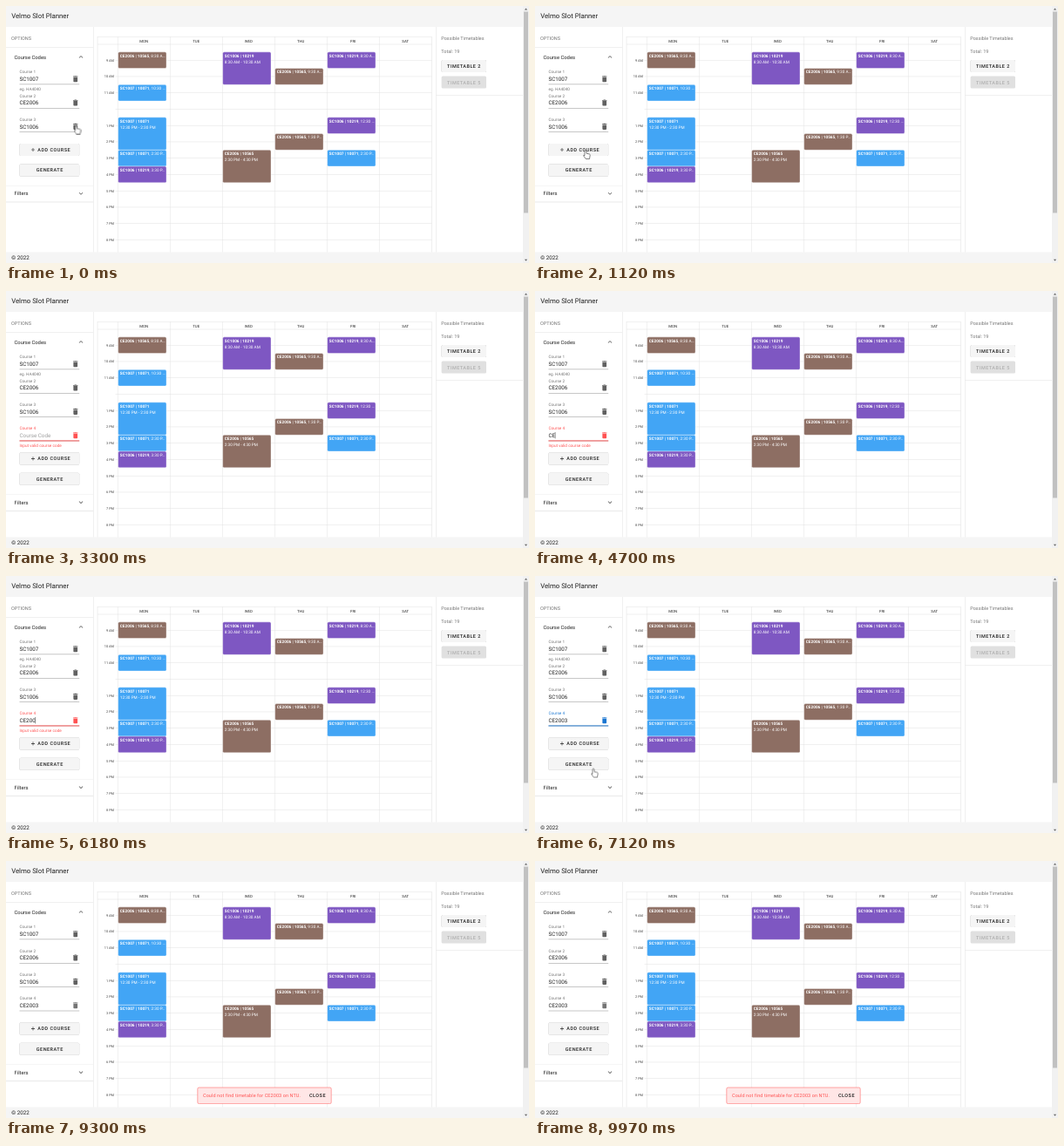
An HTML page that plays this animation: 600x295 px, repeating every 10 s.

```html
<!DOCTYPE html>
<html lang="en">
<head>
<meta charset="utf-8">
<title>Velmo Slot Planner</title>
<style>
html, body { margin: 0; width: 100%; height: 100%; overflow: hidden; background: #fff; }
svg { display: block; width: 600px; height: 295px; font-family: Roboto, sans-serif; text-rendering: geometricPrecision; }
text { fill: #212121; white-space: pre; }
.soft { fill: #757575; }
.btn { font-weight: 500; letter-spacing: .49px; }
.raised { filter: drop-shadow(0 .9px .7px rgba(0,0,0,.32)); }
.ev { fill: #fff; }
.ev tspan { font-weight: 700; }
.tint { fill: currentColor; }

/* One loop is 10 s, so 1% is 100 ms. */
.a { animation: 10s step-end infinite; }
.smooth { animation-timing-function: ease-in-out; }
.lower { animation-name: lower; }
.row4 { animation-name: appear; color: #757575; }
.state { animation-name: state; }
.hint { animation-name: hint; }
.ph { animation-name: ph; }
.err { animation-name: err; }
.label { animation-name: label; }
.focus { animation-name: focus; transform-origin: 49.7px 172px; }
.typed { animation-name: typed; }
.caretX { animation-name: caretX; }
.caret { animation-name: caret; }
.idle { animation-name: idle; }
.busy { animation-name: busy; }
.toast { animation-name: toast; transform-origin: 296px 269px; }
.move { animation-name: move; }
.hand { animation-name: hand; }
.arrow { animation-name: arrow; }

@keyframes lower { 0% { transform: none } 12%, 100% { transform: translateY(27.34px) } }
@keyframes appear { 0% { visibility: hidden } 12%, 100% { visibility: visible } }
@keyframes state {
  0% { color: #757575 } 17% { color: #1976d2 } 26% { color: #ff5252 }
  66% { color: #1976d2 } 77%, 100% { color: #757575 }
}
@keyframes hint { 0% { visibility: visible } 77%, 100% { visibility: hidden } }
@keyframes ph { 0% { visibility: hidden } 17% { visibility: visible } 39%, 100% { visibility: hidden } }
@keyframes err { 0% { visibility: hidden } 26% { visibility: visible } 66%, 100% { visibility: hidden } }
@keyframes label {
  0%, 17% { transform: translate(15.5px, 167.8px) }
  18.4%, 100% { transform: translate(15.5px, 159.2px) scale(.75) }
}
@keyframes focus { 0%, 17% { transform: scaleX(0) } 18.4%, 77% { transform: none } 78.5%, 100% { transform: scaleX(0) } }
@keyframes typed {
  0% { width: 0 } 39% { width: 4.1px } 47% { width: 7.6px } 54% { width: 11.1px }
  57.5% { width: 14.6px } 61% { width: 18.1px } 66%, 100% { width: 30px }
}
@keyframes caretX {
  0% { transform: none } 39% { transform: translateX(4.1px) } 47% { transform: translateX(7.6px) }
  54% { transform: translateX(11.1px) } 57.5% { transform: translateX(14.6px) }
  61% { transform: translateX(18.1px) } 66%, 100% { transform: translateX(21.7px) }
}
@keyframes caret {
  0%, 22%, 32%, 44%, 52%, 71%, 77%, 100% { visibility: hidden }
  17%, 27%, 37%, 47%, 54%, 76% { visibility: visible }
}
@keyframes idle { 0% { visibility: visible } 77% { visibility: hidden } 88%, 100% { visibility: visible } }
@keyframes busy { 0% { visibility: hidden } 77% { visibility: visible } 88%, 100% { visibility: hidden } }
@keyframes toast { 0%, 88% { opacity: 0; transform: scale(.8) } 89.5%, 100% { opacity: 1; transform: none } }
@keyframes move {
  0%, 2% { transform: translate(80.5px, 137.5px) }
  9%, 12.3% { transform: translate(58px, 166px) }
  15% { transform: translate(44px, 165px) }
  67% { transform: translate(50px, 188px) }
  70.5%, 78% { transform: translate(67px, 221.5px) }
  83%, 100% { transform: translate(98.5px, 198.5px) }
}
@keyframes hand {
  0%, 7%, 69% { visibility: visible }
  2.6%, 13.5%, 78%, 100% { visibility: hidden }
}
@keyframes arrow {
  0%, 7%, 69%, 88%, 100% { visibility: hidden }
  2.6%, 67%, 78% { visibility: visible }
}

/* Seven turns per loop keep the spinner in step. */
.spin { animation: spin 1.42857s linear -.8716s infinite; }
.dash { animation: dash 1.42857s ease-in-out -.8716s infinite; fill: none; stroke: #212121; stroke-width: .85; }
@keyframes spin { from { transform: rotate(40deg) } to { transform: rotate(400deg) } }
@keyframes dash {
  0% { stroke-dasharray: 1 200; stroke-dashoffset: 0 }
  50% { stroke-dasharray: 100 200; stroke-dashoffset: -15 }
  100% { stroke-dasharray: 100 200; stroke-dashoffset: -124 }
}
</style>
</head>
<body>
<svg id="stage" viewBox="0 0 600 295" xmlns="http://www.w3.org/2000/svg"></svg>
<script>
const BROWN = '#8d6e63', PURPLE = '#7e57c2', BLUE = '#42a5f5', LINE = '#e0e0e0';
const ROW = 27.34, HOUR = 18.75, NINE = 62.2, COL = 60;
const ICON = {
  trash: 'M19 4H15.5L14.5 3H9.5L8.5 4H5V6H19M6 19A2 2 0 0 0 8 21H16A2 2 0 0 0 18 19V7H6V19Z',
  plus: 'M19 13H13V19H11V13H5V11H11V5H13V11H19V13Z',
  down: 'M7.41 8.58L12 13.17L16.59 8.58L18 10L12 16L6 10Z',
  up: 'M7.41 15.42L12 10.83L16.59 15.42L18 14L12 8L6 14Z'
};

const text = (x, y, size, str, attrs = '') =>
  `<text x="${x}" y="${y}" font-size="${size}" ${attrs}>${str}</text>`;
const rect = (x, y, w, h, fill, attrs = '') =>
  `<rect x="${x}" y="${y}" width="${w}" height="${h}" fill="${fill}" ${attrs}/>`;
const hLine = (x, y, w, color = LINE) => rect(x, y - .25, w, .5, color);
const vLine = (x, y, h, color = LINE) => rect(x - .25, y, .5, h, color);
const icon = (name, cx, cy, attrs = 'fill="#616161"', scale = .39) =>
  `<path d="${ICON[name]}" transform="translate(${cx - 12 * scale} ${cy - 12 * scale}) scale(${scale})" ${attrs}/>`;
const group = (cls, body) => `<g class="${cls}">${body}</g>`;

const button = (x, y, w, fill = '#f5f5f5', cls = 'raised') =>
  rect(x, y, w, 14.1, fill, `rx="1.5" class="${cls}"`);

const spinner = y =>
  `<g transform="translate(50 ${y})"><g class="spin"><circle class="dash" r="4.1" pathLength="125.66"/></g></g>`;

function field(i, code) {
  const y = 77.2 + i * ROW;
  return text(15.5, y, 4.69, 'Course ' + (i + 1), 'class="soft"') +
    text(15.5, y + 8.7, 6.25, code) +
    hLine(15.5, y + 12.7, 68.7, '#8f8f8f') +
    icon('trash', 79.7, y + 6.5);
}

function newField() {
  const tinted = icon('trash', 79.7, 165.7, 'class="tint"') +
    group('a smooth label', text(0, 0, 6.25, 'Course 4', 'class="tint"')) +
    rect(15.5, 171.5, 68.7, .9, 'currentColor', 'class="a smooth focus"');
  return group('a row4',
    hLine(15.5, 172, 68.7, '#8f8f8f') + group('a state', tinted)) +
    group('a ph', text(15.5, 167.9, 6.25, 'Course Code', 'style="fill:#9e9e9e"')) +
    group('a err', text(15.5, 179, 4.69, 'Input valid course code', 'style="fill:#ff5252"')) +
    '<clipPath id="typed"><rect class="a typed" x="15.3" y="160" height="10"/></clipPath>' +
    text(15.5, 167.9, 6.25, 'CE2003', 'clip-path="url(#typed)"') +
    group('a caretX', rect(15.5, 162, .5, 7.4, '#212121', 'class="a caret"'));
}

function sidebar() {
  const actions = button(15.5, 158, 68.7) + button(15.5, 181.4, 68.7) +
    group('a idle',
      icon('plus', 31, 165, 'fill="#212121"', .293) +
      text(36.3, 167, 5.47, 'ADD COURSE', 'class="btn"') +
      text(50.3, 190.4, 5.47, 'GENERATE', 'class="btn" text-anchor="middle"')) +
    group('a busy', spinner(165) + spinner(188.4)) +
    hLine(0, 206.2, 100, '#ececec') +
    text(9.5, 217.3, 5.86, 'Filters') + icon('down', 86, 215.3) +
    hLine(0, 225, 100, '#d4d4d4');
  return text(6, 38.7, 5.47, 'OPTIONS', 'class="soft"') +
    vLine(100.5, 24, 259) + hLine(0, 47.6, 100, LINE) +
    text(9.5, 60.6, 5.86, 'Course Codes') + icon('up', 86, 58.5) +
    ['SC1007', 'CE2006', 'SC1006'].map((c, i) => field(i, c)).join('') +
    group('a hint', text(15.5, 97, 4.69, 'eg. HA4040', 'class="soft"')) +
    newField() + group('a lower', actions);
}

// Start is in hours from 9 AM; a two-hour slot has its time on a second line.
function slot(day, start, color, name, time, hours = 1) {
  const x = 128.6 + day * COL, y = NINE + start * HOUR;
  const title = `<tspan>${name}</tspan>` + (hours > 1 ? '' : ', ' + time + '…');
  return rect(x, y, 55.4, hours * HOUR, color, 'rx="1.6" stroke="#fff" stroke-width=".4"') +
    text(x + 2.2, y + 5.7, 4.69, title, 'class="ev"') +
    (hours > 1 ? text(x + 2.2, y + 12.9, 4.69, time, 'class="ev"') : '');
}

function calendar() {
  let out = rect(105, 35.2, 383.5, 260, 'none', `stroke="${LINE}" stroke-width=".5"`);
  ['MON', 'TUE', 'WED', 'THU', 'FRI', 'SAT'].forEach((d, i) => {
    out += vLine(128.2 + i * COL, 35.2, 248) +
      text(158.2 + i * COL, 41.6, 4.3, d, 'text-anchor="middle"');
  });
  out += hLine(105, 44, 383.5);
  for (let h = 9; h <= 20; h++) {
    const y = NINE + (h - 9) * HOUR;
    out += hLine(125.5, y, 363);
    if (h !== 12) out += text(124, y + 1.5, 3.9, (h > 12 ? h - 12 + ' PM' : h + ' AM'),
      'text-anchor="end" style="fill:#424242"');
  }
  const ce = 'CE2006 | 10565', sc6 = 'SC1006 | 10219', sc7 = 'SC1007 | 10071';
  return out +
    slot(0, -.5, BROWN, ce, '8:30 A') +
    slot(0, 1.5, BLUE, sc7, '10:30 ') +
    slot(0, 3.5, BLUE, sc7, '12:30 PM - 2:30 PM', 2) +
    slot(0, 5.5, BLUE, sc7, '2:30 P') +
    slot(0, 6.5, PURPLE, sc6, '3:30 P') +
    slot(2, -.5, PURPLE, sc6, '8:30 AM - 10:30 AM', 2) +
    slot(2, 5.5, BROWN, ce, '2:30 PM - 4:30 PM', 2) +
    slot(3, .5, BROWN, ce, '9:30 A') +
    slot(3, 4.5, BROWN, ce, '1:30 P') +
    slot(4, -.5, PURPLE, sc6, '8:30 A') +
    slot(4, 3.5, PURPLE, sc6, '12:30 ') +
    slot(4, 5.5, BLUE, sc7, '2:30 P');
}

function results() {
  return vLine(493.4, 24, 259) + hLine(493.4, 102.3, 99.6) +
    text(499.3, 38.6, 5.47, 'Possible Timetables', 'class="soft"') +
    text(499.3, 54, 5.47, 'Total: 19', 'class="soft"') +
    button(499.6, 62, 51.4) +
    text(525.5, 71, 5.47, 'TIMETABLE 2', 'class="btn" text-anchor="middle"') +
    button(499.6, 80.5, 51.4, LINE, '') +
    text(525.5, 89.5, 5.47, 'TIMETABLE 5', 'class="btn" text-anchor="middle" style="fill:#b0b0b0"');
}

function frame() {
  return rect(0, 0, 593, 24, '#f5f5f5', 'class="raised"') +
    text(6.2, 14.4, 7.81, 'Velmo Slot Planner') +
    rect(0, 282.5, 593, 12.5, '#f5f5f5') +
    text(6.2, 291.3, 6.25, '© 2022') +
    rect(593, 0, 7, 295, '#f1f1f1') + rect(594, 6.5, 5, 231, '#c1c1c1') +
    '<path d="M594.9 4.4L596.5 2.4L598.1 4.4ZM594.9 290.8L596.5 292.8L598.1 290.8Z" fill="#606060"/>';
}

const toast = group('a smooth toast',
  rect(219.8, 260, 153.4, 18.6, '#ffe6e6', 'rx="1.6" stroke="#ff5252" stroke-width=".5"') +
  text(226, 271.1, 5.47, 'Could not find timetable for CE2003 on NTU.', 'letter-spacing=".097" style="fill:#ff5252"') +
  text(348, 271.1, 5.47, 'CLOSE', 'class="btn"'));

const pointer = '<g class="a smooth move" fill="#fff" stroke="#333" stroke-width=".6" stroke-linejoin="round">' +
  '<path class="a hand" d="M-1 .8Q-1-.3 0-.3T1 .8V3.2L4.5 4Q5.4 4.3 5.2 5.5L4.5 9.5H.3L-2.3 6Q-2.6 4.8-1 5.6Z"/>' +
  '<path class="a arrow" d="M0 0V7.2L1.7 5.7L2.8 8.2L3.9 7.7L2.9 5.3H5.1Z"/></g>';

document.getElementById('stage').innerHTML =
  sidebar() + calendar() + results() + frame() + toast + pointer;
</script>
</body>
</html>
```
